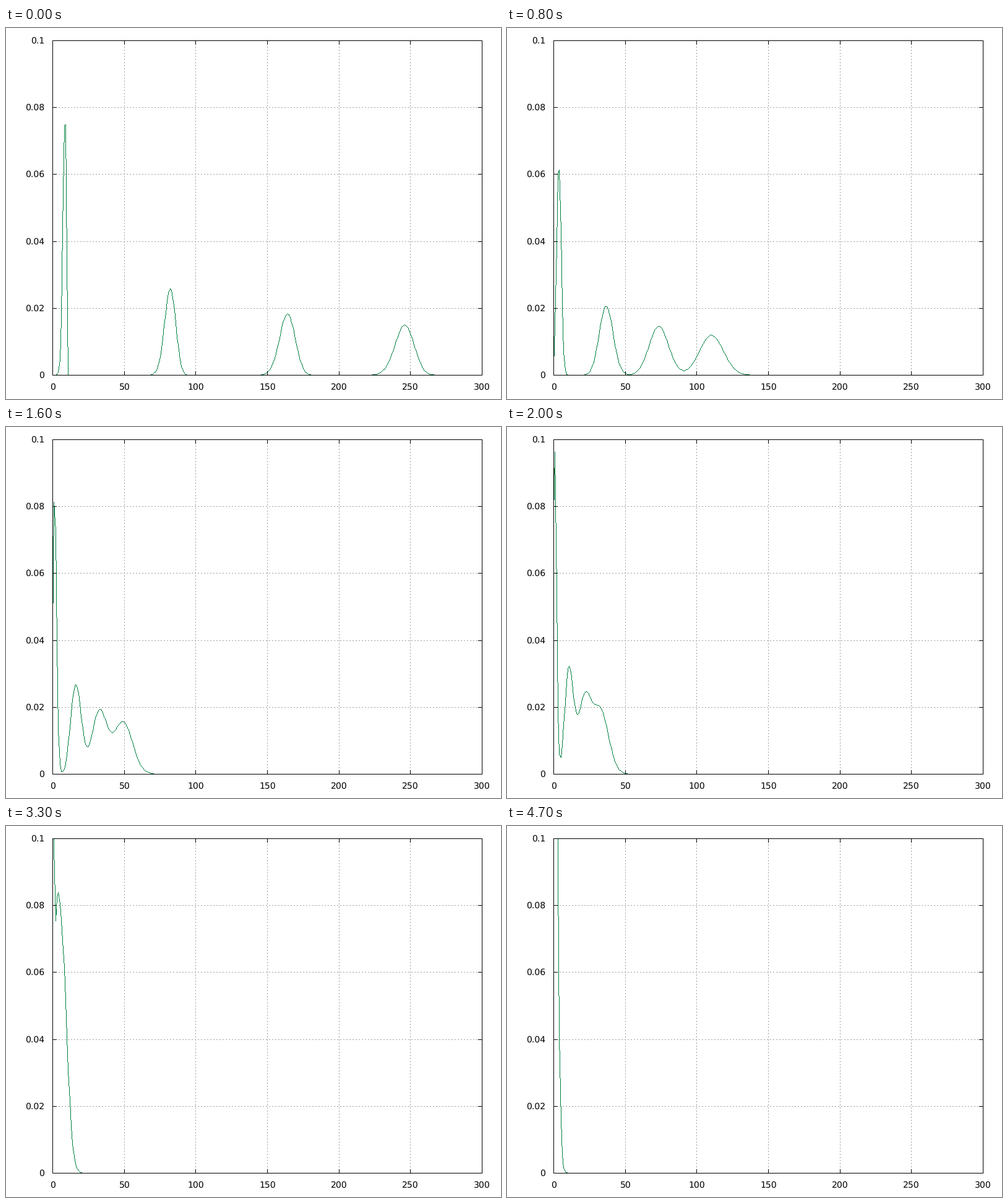
These frames come from a looping animation (800x600 px, 4.8 s). A matplotlib script:

```python
from math import comb, exp

import matplotlib.pyplot as plt
import numpy as np
from matplotlib.animation import FuncAnimation
from matplotlib.colors import to_rgba

W, H, DPI = 800, 600, 100
LEFT, RIGHT, TOP, BOTTOM = 75, 769, 20, 561
X_MAX, Y_MAX = 300, 0.1
FRAMES, INTERVAL = 48, 100
PX = 72 / DPI
TICK = 6

plt.rcParams.update({
    "path.snap": False,
    "font.family": "DejaVu Sans",
    "font.size": 14 * PX,
    "text.hinting": "no_hinting",
})

fig = plt.figure(figsize=(W / DPI, H / DPI), dpi=DPI, facecolor="white")
ax = fig.add_axes([0, 0, 1, 1])
ax.axis("off")


def px_x(x):
    return np.floor(LEFT + (RIGHT - LEFT) * x / X_MAX + 0.5).astype(int)


def px_y(y):
    return np.floor(BOTTOM - (BOTTOM - TOP) * y / Y_MAX + 0.5).astype(int)


def stroke(xs, ys, color="black", **kw):
    ax.plot(xs, ys, color=color, lw=PX, **kw)


def hline(x0, x1, y, **kw):
    stroke([x0, x1], [y + 0.5] * 2, **kw)


def vline(x, y0, y1, **kw):
    stroke([x + 0.5] * 2, [y0, y1], **kw)


# Grid, ticks and labels
grid = dict(color="#a0a0a0", ls=(0, (2, 3)), zorder=1)
edge = dict(zorder=4, solid_capstyle="butt")

for value in range(0, X_MAX + 1, 50):
    x = px_x(np.float64(value))
    if 0 < value < X_MAX:
        vline(x, BOTTOM + 1, TOP, **grid)
    vline(x, BOTTOM + 1, BOTTOM - TICK, **edge)
    vline(x, TOP, TOP + TICK + 1, **edge)
    ax.text(x + 0.5, 585, str(value), ha="center", va="baseline")

for step in range(6):
    value = step * 0.02
    y = px_y(np.float64(value))
    if 0 < step < 5:
        hline(LEFT, RIGHT + 1, y, **grid)
    hline(LEFT, LEFT + TICK + 1, y, **edge)
    hline(RIGHT - TICK, RIGHT + 1, y, **edge)
    ax.text(62, y + 5, f"{value:.2g}", ha="right", va="baseline")

for y in (TOP, BOTTOM):
    hline(LEFT, RIGHT + 1, y, **edge)
for x in (LEFT, RIGHT):
    vline(x, TOP, BOTTOM + 1, **edge)

# Equal mixture of four binomials whose survival probability decays
SIZES = (10, 100, 200, 300)
k = np.arange(X_MAX + 1)
ways = {n: np.array([float(comb(n, i)) for i in range(n + 1)]) for n in SIZES}


def mixture(p):
    total = np.zeros(len(k))
    for n in SIZES:
        m = k[:n + 1]
        total[:n + 1] += ways[n] * p ** m * (1 - p) ** (n - m)
    return total / len(SIZES)


# The curve is a one-pixel polyline without smoothing
INK = to_rgba("#008040")
blank = np.zeros((BOTTOM - TOP + 1, RIGHT - LEFT + 1, 4))
plot = ax.imshow(blank, extent=(LEFT, RIGHT + 1, BOTTOM + 1, TOP),
                 interpolation="nearest", aspect="auto", zorder=3)
ax.set(xlim=(0, W), ylim=(H, 0))


def trace(xs, ys):
    """Colour the pixels along the polyline, clipped to the plot box."""
    image = blank.copy()
    for x0, y0, x1, y1 in zip(xs, ys, xs[1:], ys[1:]):
        n = max(abs(x1 - x0), abs(y1 - y0)) + 1
        cols = np.rint(np.linspace(x0, x1, n)).astype(int)
        rows = np.rint(np.linspace(y0, y1, n)).astype(int)
        inside = rows >= TOP
        image[rows[inside] - TOP, cols[inside] - LEFT] = INK
    return image


def update(i):
    p = exp(-0.2 - 0.1 * i)
    plot.set_data(trace(px_x(k), px_y(mixture(p))))
    return plot,


anim = FuncAnimation(fig, update, frames=FRAMES, interval=INTERVAL,
                     repeat=True, repeat_delay=0)
plt.show()
```
